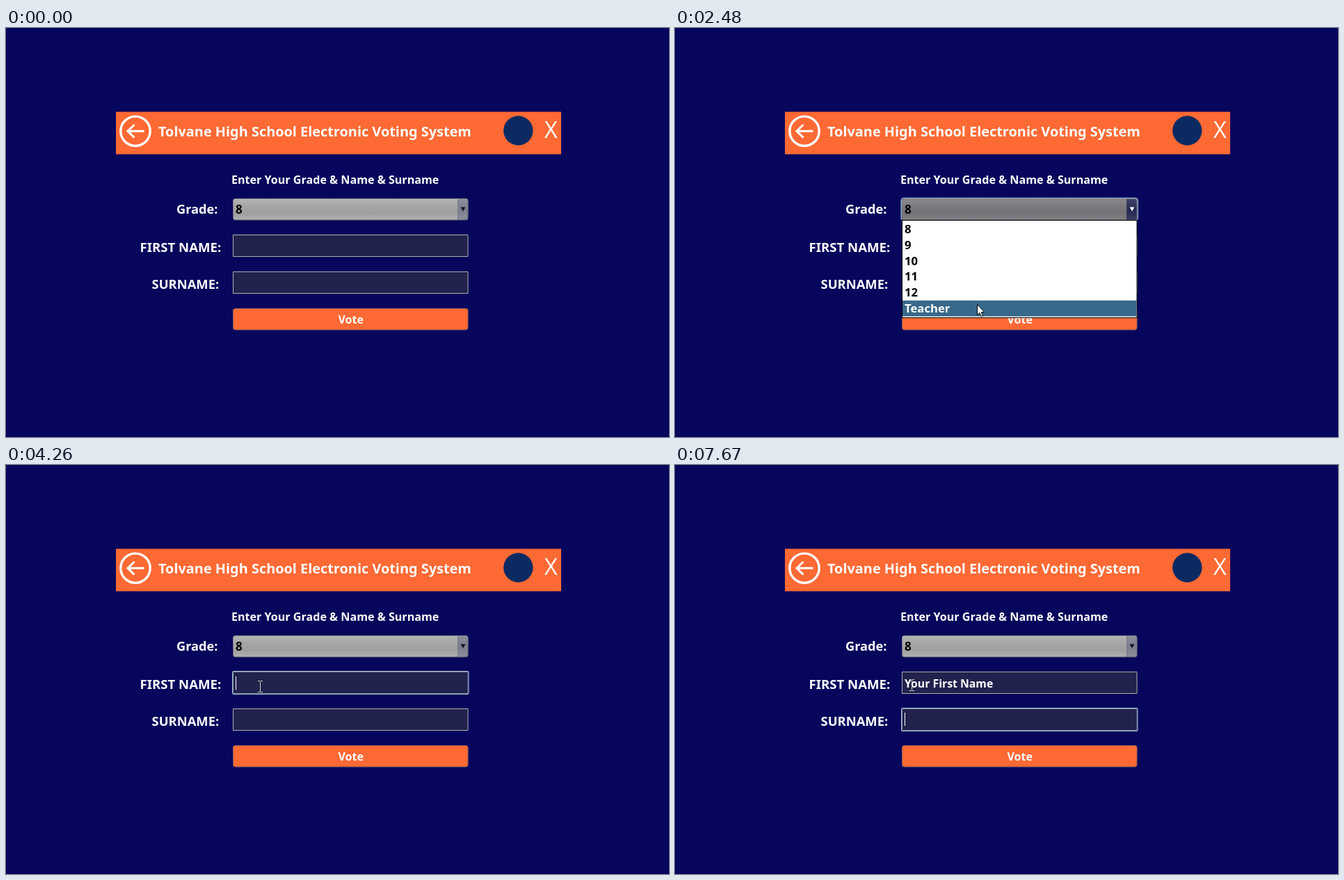
Animation of 953x588 px, one loop 8000 ms. Source, as an HTML page with a canvas:

```html
<!DOCTYPE html>
<html lang="en">
<head>
<meta charset="utf-8">
<title>Voting form</title>
<style>
  html, body { margin: 0; width: 100%; height: 100%; overflow: hidden; background: #06065c; }
  canvas { display: block; }
</style>
</head>
<body>
<canvas id="stage" width="953" height="588"></canvas>
<script>
const ctx = document.getElementById('stage').getContext('2d');
const LOOP = 8000, TICK = 77.5;
const NAVY = '#06065c', ORANGE = '#ff6934', SELECTED = '#39698a';
const OPTIONS = ['8', '9', '10', '11', '12', 'Teacher'];
const ROW = 22.9, LIST_TOP = 277.2;
const LEFT = 326.5, WIDTH = 337.5;

// Event times in ms
const ENTER = 310, HOVER = 1160, OPEN = 1540, CLOSE = 3797;
const FOCUS_FIRST = 4090, TYPE = 4870, FOCUS_LAST = 7670;

// Pointer legs; power above 1 slows down towards the end
const leg = (start, end, x, y, power = 1) => ({ start, end, x, y, power });
const LEGS = [
  leg(ENTER, 1470, 474, 261, 2),
  leg(1700, 2480, 434, 397),
  leg(2550, 2870, 421, 368),
  leg(2870, 3570, 350, 293, 2),
  leg(CLOSE, FOCUS_FIRST, 366, 318),
  leg(4250, 4640, 340, 316)
];

function pointer(t) {
  const now = ENTER + TICK * Math.floor((t - ENTER) / TICK + 0.1);
  let x = 858, y = 572;
  for (const m of LEGS) {
    const u = Math.max(0, Math.min(1, (now - m.start) / (m.end - m.start)));
    const k = 1 - (1 - u) ** m.power;
    x += (m.x - x) * k;
    y += (m.y - y) * k;
  }
  return [Math.round(x), Math.round(y)];
}

// Capitals come after a pause, and the pauses shrink with every word
function typed(t) {
  let at = TYPE, out = '';
  ['Your', 'First', 'Name'].forEach((word, w) => {
    const hurry = 80 * w;
    const text = w ? ' ' + word : word;
    if (w) at += 230;
    for (let i = 0; i < text.length; i++) {
      if (at <= t) out += text[i];
      const next = text[i + 1];
      if (text[i] === ' ') at += 480 - hurry;
      else if (text[i] === word[0]) at += 310 - hurry;
      else if (next) at += 76;
    }
  });
  return out;
}

function text(str, x, y, size, color = '#fff', align = 'left') {
  ctx.font = `700 ${size}px "Noto Sans", "Open Sans", sans-serif`;
  ctx.textAlign = align;
  ctx.fillStyle = color;
  ctx.fillText(str, x, y);
}

function rect(x, y, w, h, color) {
  ctx.fillStyle = color;
  ctx.fillRect(x, y, w, h);
}

function box(x, y, w, h, r, fill, stroke, width = 1) {
  ctx.beginPath();
  ctx.roundRect(x, y, w, h, r);
  if (fill) { ctx.fillStyle = fill; ctx.fill(); }
  if (stroke) { ctx.strokeStyle = stroke; ctx.lineWidth = width; ctx.stroke(); }
}

function disc(x, y, r) {
  ctx.beginPath();
  ctx.arc(x, y, r, 0, Math.PI * 2);
}

function shade(y0, y1, ...colors) {
  const g = ctx.createLinearGradient(0, y0, 0, y1);
  colors.forEach((c, i) => g.addColorStop(i / (colors.length - 1), c));
  return g;
}

function header() {
  rect(158, 120.5, 640, 61, ORANGE);
  ctx.strokeStyle = '#fff';
  ctx.lineWidth = 3.4;
  disc(186, 148.3, 21.2);
  ctx.stroke();
  ctx.lineWidth = 3;
  ctx.stroke(new Path2D('M175 148.3 H198.5 M184.5 139 L175 148.3 L184.5 157.6'));
  text('Tolvane High School Electronic Voting System', 219, 156, 19.9);
  disc(736.3, 147.5, 21.2);
  ctx.fillStyle = '#0b2a62';
  ctx.fill();
  ctx.font = '400 33px "Open Sans", "Noto Sans", sans-serif';
  ctx.textAlign = 'center';
  ctx.fillStyle = '#fff';
  ctx.fillText('X', 783.3, 158);
}

function combo(hover, open, focus) {
  let fill = ['#b4b4b4', '#a6a6a6', '#9f9f9f', '#b1b1b1'];
  let side = ['#8c8f9c', '#7a7e8c', '#8c909b'];
  if (hover) {
    fill = ['#bdbdbd', '#b3b3b3', '#b0b0b0', '#bcbcbc'];
    side = ['#a0a2ae', '#8b8f9c', '#a0a3ad'];
  }
  if (open) {
    fill = ['#8b898d', '#7c7a7f', '#737176', '#838187'];
    side = ['#43456c', '#25274f', '#3a3c65'];
  }
  if (focus) box(325.2, 244.5, 340, 32.5, 4, null, '#7fa6c4', 1.6);
  box(LEFT, 245.5, WIDTH, 30.5, 3, shade(246, 276, ...fill));
  ctx.save();
  ctx.clip();
  rect(650, 245, 15, 32, shade(246, 276, ...side));
  rect(649, 245, 1, 32, open ? '#3a3b55' : '#777a86');
  ctx.restore();
  box(LEFT, 245.5, WIDTH, 30.5, 3, null, shade(245, 276, '#85868e', '#62636f'));
  ctx.fillStyle = open ? '#fff' : '#11131f';
  ctx.fill(new Path2D('M653.6 257.5 h6.8 l-3.4 6 z'));
  text('8', 330, 267, 17, '#000');
}

function field(y, focus) {
  box(LEFT, y + 0.5, WIDTH, 31, 0, '#22224e', focus ? '#7d91a8' : '#b0b0ac');
  if (focus) box(LEFT - 1, y - 0.5, WIDTH + 2, 33, 1, null, '#a3bbcd');
}

function caret(x, y) {
  rect(Math.round(x), y, 1, 19, '#fff');
}

function list(y) {
  const last = OPTIONS.length - 1;
  const active = Math.max(0, Math.min(last, Math.floor((y - LIST_TOP) / ROW)));
  rect(326, 276, 338.5, 141, '#000');
  rect(327, 277, 336.5, 139, '#fff');
  rect(327, LIST_TOP + active * ROW, 336.5, ROW, SELECTED);
  OPTIONS.forEach((label, i) =>
    text(label, 330, 295 + Math.round(i * 22.8), 16.7, i === active ? '#fff' : '#000'));
}

function arrow(x, y) {
  const shape = new Path2D('M.5 .5 v15 l3.4 -3 l2.4 5.2 l2.2 -1 l-2.2 -5.2 h4.5 z');
  ctx.save();
  ctx.translate(x, y);
  ctx.fillStyle = '#fff';
  ctx.fill(shape);
  ctx.strokeStyle = '#000';
  ctx.lineWidth = 1;
  ctx.stroke(shape);
  ctx.restore();
}

function beam(x, y) {
  const color = '#d2d0bd';
  rect(x, y - 7, 1, 15, color);
  for (const dy of [-8, 8]) {
    rect(x - 3, y + dy, 3, 1, color);
    rect(x + 1, y + dy, 3, 1, color);
  }
}

function draw(t) {
  const [x, y] = pointer(t);
  const open = t >= OPEN && t < CLOSE;
  const first = t >= FOCUS_FIRST && t < FOCUS_LAST;
  const last = t >= FOCUS_LAST;
  const name = typed(t);

  rect(0, 0, 953, 588, NAVY);
  header();
  text('Enter Your Grade & Name & Surname', 324, 224, 16.1);
  text('Grade:', 245, 267, 18.2);
  text('FIRST NAME:', 192.5, 322, 18.6);
  text('SURNAME:', 209.5, 375, 18.4);

  combo(t >= HOVER && t < OPEN, open, t >= OPEN && t < FOCUS_FIRST);
  field(297, first);
  text(name, 330, 320, 15.8);
  if (first) caret(330 + ctx.measureText(name).width, 304);
  field(350, last);
  if (last) caret(330, 356);

  box(LEFT, 403.5, WIDTH, 30.5, 3, ORANGE, shade(403, 434, '#b06a55', '#6d5661'));
  text('Vote', 495.7, 425, 16, '#fff', 'center');

  if (open) list(y);
  if (t < ENTER) return;
  if (t >= CLOSE && y > 297) beam(x, y);
  else arrow(x, y);
}

function frame(now) {
  draw(now % LOOP);
  requestAnimationFrame(frame);
}
requestAnimationFrame(frame);
</script>
</body>
</html>
```
